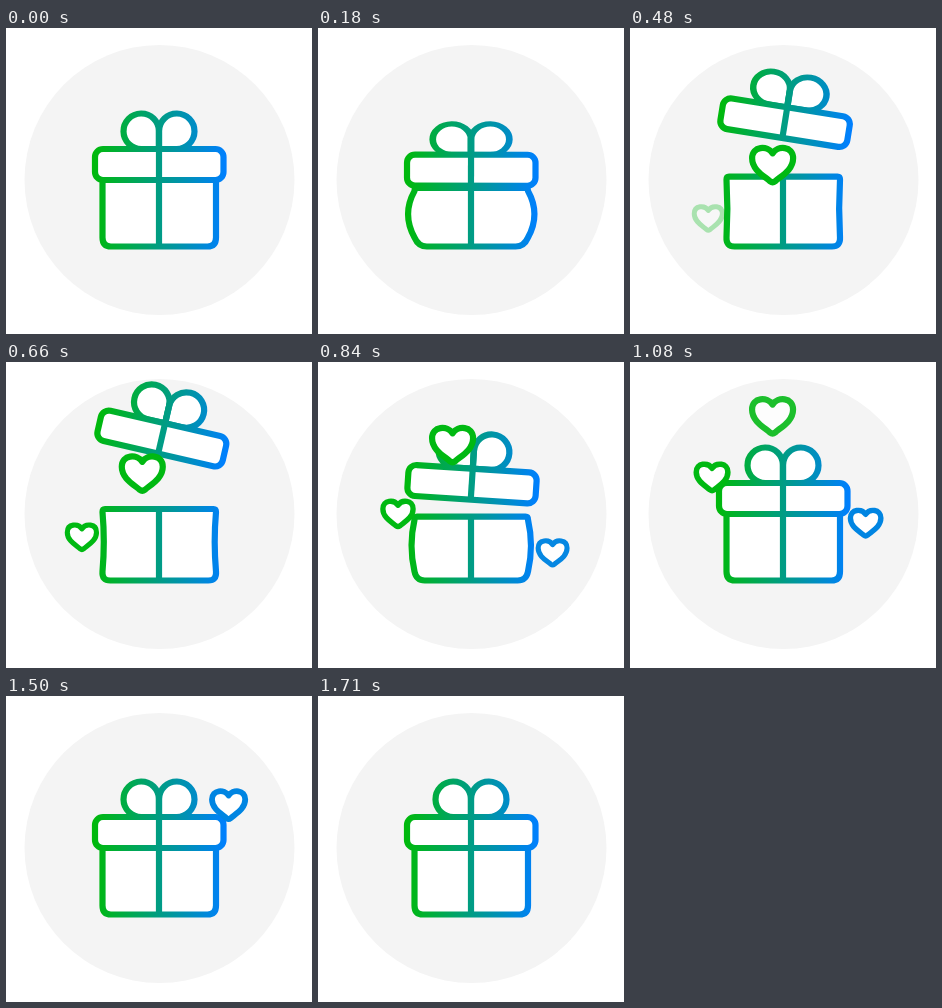
These frames come from a looping animation (306x306 px, 2700 ms). An HTML page:

```html
<!DOCTYPE html>
<html>
<head>
<meta charset="utf-8">
<style>
html, body { margin: 0; height: 100%; overflow: hidden; background: #fff }
svg { display: block; width: 100%; height: 100% }
</style>
</head>
<body>
<svg viewBox="0 0 306 306">
  <defs>
    <linearGradient id="hue" gradientUnits="userSpaceOnUse" x1="88" y1="0" x2="220" y2="0">
      <stop stop-color="#00b90c"/><stop offset="1" stop-color="#007fff"/>
    </linearGradient>
    <path id="heart" d="M0-11.5C-5-19.5-20.5-19-20.5-6.5C-20.5 5-9 11-2.5 16.5Q0 18.5 2.5 16.5C9 11 20.5 5 20.5-6.5C20.5-19 5-19.5 0-11.5Z"/>
  </defs>
  <circle cx="153.5" cy="152" r="135" fill="#f4f4f4"/>
  <g fill="#fff" stroke="url(#hue)" stroke-width="6.2" stroke-linejoin="round">
    <path id="body"/>
    <g id="lid">
      <g id="bow">
        <path d="M153 121H135.5A17.75 17.75 0 1 1 153 103Z"/>
        <path d="M153 121H170.5A17.75 17.75 0 1 0 153 103Z"/>
      </g>
      <rect x="89" y="121" width="128.5" height="31" rx="8"/>
      <path d="M153 98V152"/>
    </g>
  </g>
  <g id="hearts" fill="#fff" stroke-linejoin="round"></g>
</svg>
<script>
const LOOP = 2700, LIFE = 1000, FADE = 160, TAU = 2 * Math.PI;
const $ = id => document.getElementById(id);
const clamp = v => Math.max(0, Math.min(1, v));
const ease = p => (1 - Math.cos(Math.PI * clamp(p))) / 2;

// Eases from 0 up to 1 at peak, then back to 0 at end
const bump = (t, start, peak, end) =>
  ease(t < peak ? (t - start) / (peak - start) : (end - t) / (end - peak));

// Each heart rises from y while swaying around x; surge makes the middle of the rise faster
const hearts = [
  { color: '#00b912', line: 6.2, start: 222, size: 1, grow: 0,
    x: 138.7, sway: 4.7, turns: 1.35, peak: .19, y: 160, rise: 117, surge: .38 },
  { color: '#00b912', line: 7.2, start: 433, size: .68, grow: .14,
    x: 79.3, sway: 3.5, turns: 1.35, peak: .57, y: 193.5, rise: 112, surge: .4 },
  { color: '#0085e2', line: 7.2, start: 685, size: .68, grow: .16,
    x: 229, sway: 7.5, turns: .8, peak: .3, y: 210, rise: 124, surge: 0 }
];

for (const h of hearts) {
  h.el = $('heart').cloneNode();
  h.el.removeAttribute('id');
  h.el.setAttribute('stroke', h.color);
  h.el.setAttribute('stroke-width', h.line);
  $('hearts').append(h.el);
}

function drawGift(t) {
  const open = bump(t, 160, 670, 938);
  const press = bump(t, 0, 160, 500) + bump(t, 740, 938, 1080);
  const flat = bump(t, 0, 300, 600);

  const top = 152 + 8 * press - 5 * open, mid = (top + 212) / 2;
  const bulge = 13 * press - 2.6 * open, tuck = .3 * bulge;
  $('body').setAttribute('d',
    `M99 ${top}H207.5Q210 ${top} 210 ${top + 3}Q${210 + bulge} ${mid} 210 209.5` +
    `Q${210 - tuck} 218.5 ${201.5 - tuck} 218.5H${105 + tuck}Q${96.5 + tuck} 218.5 96.5 209.5` +
    `Q${96.5 - bulge} ${mid} 96.5 ${top + 3}Q96.5 ${top} 99 ${top}ZM153 ${top}V218`);

  $('lid').setAttribute('transform',
    `translate(${2.6 * open} ${6 * press - 60 * open}) rotate(${13 * open} 153.3 136.5)`);
  $('bow').setAttribute('transform',
    `translate(153 121) scale(${1 + .12 * flat} ${1 - .2 * flat}) translate(-153 -121)`);
}

function drawHeart(h, t) {
  const age = t - h.start, p = age / LIFE;
  const x = h.x + h.sway * Math.cos(TAU * h.turns * (p - h.peak));
  const y = h.y - h.rise * (p - h.surge * Math.sin(TAU * p) / TAU);
  h.el.setAttribute('opacity', clamp(Math.min(age, LIFE - age) / FADE));
  h.el.setAttribute('transform', `translate(${x} ${y}) scale(${h.size + h.grow * p})`);
}

function frame() {
  const t = performance.now() % LOOP;
  drawGift(t);
  hearts.forEach(h => drawHeart(h, t));
  requestAnimationFrame(frame);
}
frame();
</script>
</body>
</html>
```
